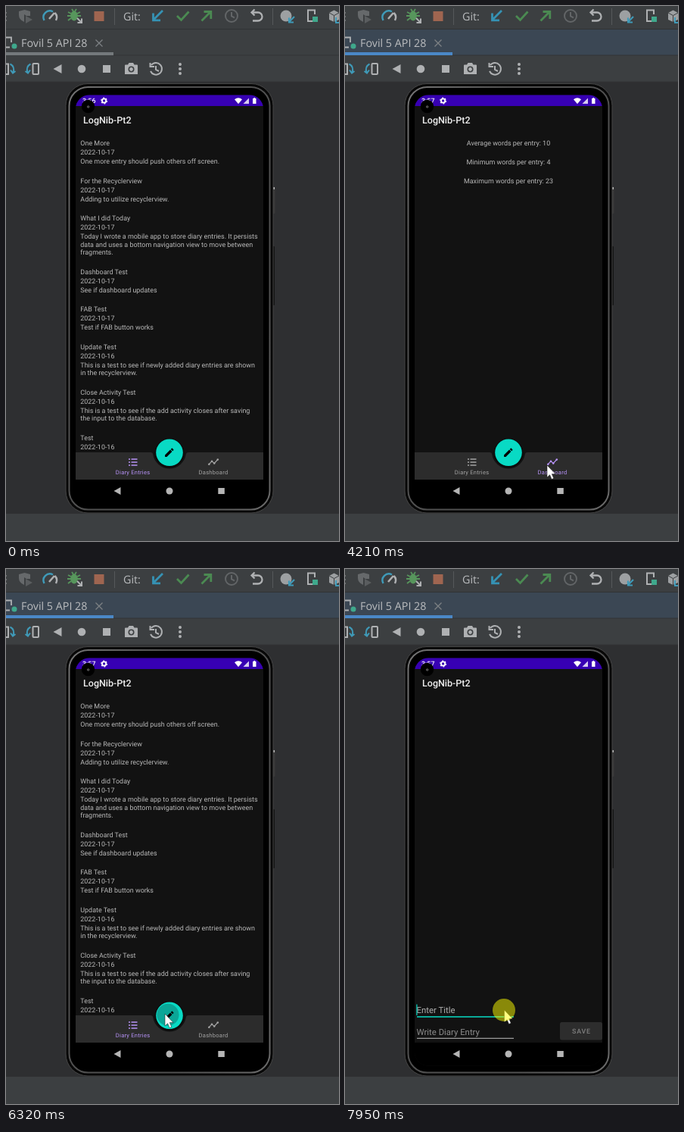
Recreate the animation shown at these times as an HTML page. Size 440 by 706 pixels, loop 8 s.

```html
<!DOCTYPE html>
<html lang="en">
<head>
<meta charset="utf-8">
<title>Diary app demo</title>
<style>
html, body { margin: 0; width: 100%; height: 100%; overflow: hidden; background: #2e2f31; }
svg { display: block; width: 440px; height: 706px; text-rendering: geometricPrecision; font-family: Roboto, sans-serif; }
.ide { font: 14.3px "Open Sans", sans-serif; fill: #bbbdbf; }
.body { font-size: 8.95px; fill: #b9b9b9; }
.tab { font-size: 7.57px; letter-spacing: .25px; text-anchor: middle; }
.hint { font-size: 11.36px; }
.mid { text-anchor: middle; }
.line { fill: none; stroke: currentColor; }
</style>
</head>
<body>
<svg viewBox="0 0 440 706" xmlns="http://www.w3.org/2000/svg">
<defs>
  <clipPath id="screenClip"><rect x="92" y="117.5" width="248" height="538" rx="18"/></clipPath>
  <clipPath id="listClip"><rect x="92" y="165" width="248" height="424"/></clipPath>
  <clipPath id="barClip"><path d="M92 589H191Q194 589 194.3 592A22 22 0 0 0 237.7 592Q238 589 241 589H340V625H92Z"/></clipPath>
  <clipPath id="fabClip"><circle cx="216" cy="589.3" r="17.8"/></clipPath>
  <linearGradient id="edge" x1="0" x2="1" y1="0" y2="1">
    <stop offset="0" stop-color="#757575"/><stop offset=".25" stop-color="#505050"/>
    <stop offset=".75" stop-color="#505050"/><stop offset="1" stop-color="#6a6a6a"/>
  </linearGradient>
</defs>

<!-- IDE chrome -->
<rect width="440" height="706" fill="#2e2f31"/>
<rect width="440" height="30" fill="#3c3f41"/>
<rect y="30" width="440" height="1" fill="#303234"/>
<rect id="strip" y="31" width="440" height="34" fill="#3c3f41"/>
<rect id="tabLine" y="61" width="142" height="4" fill="#74797c"/>
<rect y="65" width="440" height="35" fill="#3c3f41"/>
<rect y="64.5" x="142" width="298" height="1" fill="#323436"/>
<rect y="99.5" width="440" height="1" fill="#323436"/>
<rect y="670" width="440" height="36" fill="#3c3f41"/>

<g id="topIcons">
  <path d="M0 9H1M0 14H1M0 19H1" stroke="#6e7173" stroke-width="2"/>
  <path d="M17 7L24.500 5 32 7V13H27L24 11V21Q17 18 17 12Z" fill="#66696b"/>
  <path d="M26 13L35 18 26 23Z" fill="#5a5d5f"/>
  <g class="line" stroke-width="2.500"><path d="M50.500 19A8.500 8.500 0 0 1 62 7.500" color="#3f9ab8"/><path d="M64.500 9A8.500 8.500 0 0 1 66 19" color="#afb1b3"/><path d="M57 17L64 9" color="#afb1b3"/></g>
  <g color="#57965c"><ellipse cx="90" cy="13" rx="4.800" ry="6.500" fill="currentColor"/><path class="line" stroke-width="1.800" d="M82 8L86 10M98 8L94 10M81 13H99M82 19L86 16M87 4L89 7M93 4L91 7"/></g>
  <path d="M94 16L100 22M100 16.500V22H94.500" class="line" stroke-width="2" color="#afb1b3"/>
  <rect x="116.500" y="7" width="13" height="13" fill="#9f6550"/>
  <path d="M143.500 3V25M352.500 3V25" stroke="#56595b"/>
  <text class="ide" x="155" y="18.500">Git:</text>
  <g class="line" stroke-width="2.800">
    <path d="M207 6L195 18M194.500 9.500V18.800H204" color="#3592b4"/>
    <path d="M226 13L231.500 18.500 241.500 7.500" color="#4b8a52"/>
    <path d="M258.500 19.500L270 8M261.500 7.500H270.800V17" color="#4b8a52"/>
  </g>
  <g class="line" stroke-width="2" color="#626567"><circle cx="298" cy="13" r="8"/><path d="M298 8V13.500L302 15.500"/></g>
  <path class="line" stroke-width="2.300" color="#afb1b3" d="M328.500 4.500L324.500 8.500 328.500 12.500M325 8.500H333A5.500 5.500 0 0 1 333 19.500H326"/>
  <circle cx="370" cy="13" r="7.500" fill="#9da0a2"/>
  <path class="line" stroke-width="2.200" color="#3f9ab8" d="M381 14L374 21M374 15.500V21.500H380"/>
  <path class="line" stroke-width="2" color="#afb1b3" d="M406 20H399V5.500H408V11"/>
  <rect x="405" y="14" width="7" height="7" fill="#3fa88c"/>
  <path d="M427 9L433.500 5.500 440 9V18L433.500 21 427 18Z" fill="#9da0a2"/>
  <path class="line" d="M427 9L433.500 12.500 440 9M433.500 12.500V21" color="#3c3f41"/>
  <path class="line" stroke-width="2" color="#3f9ab8" d="M436 15V22H440"/>
</g>

<path class="line" stroke-width="1.800" color="#afb1b3" d="M0 41.500H7V48M0 54.500H5"/>
<circle cx="11" cy="53" r="3.500" fill="#3fa88c"/>
<text class="ide" x="20" y="54">Fovil 5 API 28</text>
<path d="M118.500 44.500L127.500 53.500M127.500 44.500L118.500 53.500" stroke="#7d8184" stroke-width="1.300"/>

<g id="deviceIcons" fill="#afb1b3" color="#afb1b3">
  <path class="line" stroke-width="2" d="M0 76.500H3V90H0"/>
  <rect class="line" stroke-width="2" x="35.500" y="76" width="7.500" height="14" rx="1"/>
  <path class="line" stroke-width="2" color="#3f9ab8" d="M5.500 76.500Q12 80 9.500 87.500M6 84.500L9 88.500 12.500 86M32.500 76.500Q26 80 28.500 87.500M32 84.500L29 88.500 25.500 86"/>
  <path d="M62.500 83L73.500 77V89Z"/>
  <circle cx="100" cy="83" r="5.300"/>
  <rect x="128" y="78" width="10" height="10"/>
  <path d="M157 78.500Q157 77.500 158 77.500H161L162.500 75H168L169.500 77.500H173Q174 77.500 174 78.500V90H157Z"/>
  <circle cx="165.500" cy="83.500" r="4" fill="#3c3f41"/><circle cx="165.500" cy="83.500" r="2.400"/>
  <path class="line" stroke-width="2" d="M192 78A7.800 7.800 0 1 1 191 86M190.500 75V80H196M198 79V84L202 86"/>
  <circle cx="230" cy="77" r="2"/><circle cx="230" cy="83" r="2"/><circle cx="230" cy="89" r="2"/>
</g>

<!-- Phone body -->
<rect x="352" y="239" width="3.500" height="35" rx="1" fill="#3a3a3a"/>
<rect x="353" y="239" width="2" height="3" fill="#b5b5b5"/>
<rect x="352" y="317" width="3" height="78" rx="1" fill="#141414"/>
<rect x="79" y="102.500" width="274" height="566.500" rx="29" fill="#080808" stroke="#454545"/>
<rect x="83.500" y="107" width="265" height="557.500" rx="25" fill="#000" stroke="url(#edge)" stroke-width="2"/>

<!-- Phone screen -->
<g clip-path="url(#screenClip)">
  <rect x="92" y="117" width="248" height="508" fill="#121212"/>
  <g id="home">
    <g id="list" clip-path="url(#listClip)" class="body"></g>
    <g id="stats" class="body mid"></g>
    <g clip-path="url(#barClip)">
      <rect x="92" y="589" width="248" height="36" fill="#2c2c2c"/>
      <circle id="ripple" cy="607" fill="#bb86fc"/>
    </g>
    <g id="diaryTab">
      <path d="M162 598H164M162 602H164M162 606H164M165.500 598H173.500M165.500 602H173.500M165.500 606H173.500" class="line" stroke-width="1.400"/>
      <text class="tab" x="167.600" y="618.200" fill="currentColor">Diary Entries</text>
    </g>
    <g id="dashTab">
      <path d="M268.300 604.700L272 600.800 275.200 603.500 279.800 598.500" class="line" stroke-width="1.200"/>
      <g fill="currentColor"><circle cx="268.300" cy="604.700" r="1.300"/><circle cx="272" cy="600.800" r="1.300"/><circle cx="275.200" cy="603.500" r="1.300"/><circle cx="279.800" cy="598.500" r="1.300"/></g>
      <text class="tab" x="274" y="618.200" fill="currentColor">Dashboard</text>
    </g>
    <circle cx="216" cy="590" r="19.500" fill="#000" opacity=".35"/>
    <circle cx="216" cy="589.300" r="17.800" fill="#08dac4"/>
    <circle id="fabRipple" clip-path="url(#fabClip)" fill="#0c9488"/>
    <path transform="translate(208.200 581.700) scale(.631)" d="M3 17.250V21h3.750L17.810 9.940l-3.750-3.750zM20.710 7.040c.39-.39.39-1.020 0-1.410l-2.340-2.340c-.39-.39-1.020-.39-1.410 0l-1.830 1.830 3.750 3.750z"/>
  </g>
  <g id="form">
    <rect x="92" y="132" width="248" height="540" fill="#121212"/>
    <text id="titleHint" class="hint" x="94.500" y="586">Enter Title</text>
    <rect id="titleLine" x="95" width="128"/>
    <rect id="caret" x="94.300" y="574.500" width="1.200" height="14.500" fill="#08dac4"/>
    <text class="hint" x="94.500" y="614.800" fill="#8c8c8c">Write Diary Entry</text>
    <rect x="95" y="618.800" width="128" height="1" fill="#bdbdbd"/>
    <rect x="284" y="598" width="56" height="23.500" rx="2.500" fill="#2d2d2d"/>
    <text class="mid" x="312.400" y="613" font-size="8.830" font-weight="500" letter-spacing=".79" fill="#808080">SAVE</text>
  </g>
  <rect x="92" y="117" width="248" height="15" fill="#3700b3"/>
  <text x="102" y="154.800" font-size="12.500" font-weight="500" fill="#f0f0f0">LogNib-Pt2</text>
  <text id="clock" x="101" y="128.200" font-size="8.830" font-weight="500" fill="#fff"></text>
  <circle cx="129.600" cy="125" r="2.600" fill="none" stroke="#fff" stroke-width="1.900"/>
  <circle cx="129.600" cy="125" r="3.900" fill="none" stroke="#fff" stroke-width="1.100" stroke-dasharray="2.040"/>
  <g fill="#fff">
    <path d="M307 129.200L302 123.200Q307 119.200 312 123.200Z"/>
    <path d="M313.500 129L321 121.500V129Z" opacity=".8"/>
    <path d="M326 122H327.300V121H329.200V122H330.500V129H326Z"/>
  </g>
  <rect x="92" y="625" width="248" height="31" fill="#000"/>
  <g fill="#b5b5b5"><path d="M142.500 640L151.500 635V645Z"/><circle cx="216" cy="640" r="4.500"/><rect x="280.300" y="636" width="8.500" height="8"/></g>
</g>
<circle cx="108.500" cy="132.500" r="8.700" fill="#000"/>
<circle cx="108.700" cy="133" r="1.300" fill="#333" stroke="#777" stroke-width=".7"/>

<path id="pointer" d="M0 0V16L3.600 12.700 6.100 18.500 8.800 17.300 6.300 11.600H11Z" fill="#fff" stroke="#111" stroke-width=".5"/>
<circle id="press" r="15" fill="#ff0" opacity=".5"/>
</svg>

<script>
const LOOP = 8000, STEP = 66.7;
const $ = id => document.getElementById(id);
const clamp = v => Math.max(0, Math.min(1, v));
const easeOut = v => 1 - (1 - clamp(v)) ** 3;
const set = (id, attrs) => { for (const k in attrs) $(id).setAttribute(k, attrs[k]); };
const show = (id, on) => set(id, { visibility: on ? 'visible' : 'hidden' });
const text = (x, y, s) => `<text x="${x}" y="${y}">${s}</text>`;

const entries = [
  ['One More', 17, 'One more entry should push others off screen.'],
  ['For the Recyclerview', 17, 'Adding to utilize recyclerview.'],
  ['What I did Today', 17, 'Today I wrote a mobile app to store diary entries. It persists',
    'data and uses a bottom navigation view to move between', 'fragments.'],
  ['Dashboard Test', 17, 'See if dashboard updates'],
  ['FAB Test', 17, 'Test if FAB button works'],
  ['Update Test', 16, 'This is a test to see if newly added diary entries are shown', 'in the recyclerview.'],
  ['Close Activity Test', 16, 'This is a test to see if the add activity closes after saving', 'the input to the database.'],
  ['Test', 16]
];
let rowY = 184;
$('list').innerHTML = entries.map(([title, day, ...lines]) => {
  const y = rowY;
  rowY += 49.5 + 10.5 * (lines.length - 1);
  return text(98.3, y, title) + text(98.3, y + 12.1, '2022-10-' + day) +
    lines.map((s, i) => text(98.3, y + 24 + i * 10.5, s)).join('');
}).join('');
$('stats').innerHTML = ['Average words per entry: 10', 'Minimum words per entry: 4', 'Maximum words per entry: 23']
  .map((s, i) => text(216, 184 + i * 25, s)).join('');

// Pointer moves: start time, then one stop per step.
const moves = [
  [520, [430, 503], [408, 521], [394, 548], [406, 568]],
  [1850, [388, 571], [344, 584], [305, 597], [286, 603]],
  [4210, [267, 606], [248, 616], [228, 623], [208, 622], [190, 615], [177, 608], [172, 605]],
  [4800, [157, 603], [168, 599.5]],
  [5930, [172, 608], [184, 623], [198, 627], [207, 612], [210, 587]],
  [6740, [210, 585], [210, 572], [210, 555], [210, 546]],
  [7620, [210, 551], [211, 564], [210, 577], [210.5, 582]]
];
const presses = [[2850, 2985], [5010, 5210], [6200, 6300], [7880, LOOP]];

function pointerAt(t) {
  const move = moves.filter(m => t >= m[0]).pop();
  if (!move) return null;
  return move[Math.min(move.length - 1, 1 + Math.floor((t - move[0]) / STEP + .02))];
}

function navRipple(t) {
  const [start, end, cx] = t < 4500 ? [2850, 3400, 274] : [5010, 5730, 167.6];
  const fade = 1 - clamp((t - start - 200) / (end - start - 200));
  set('ripple', { cx, r: 6 + 46 * easeOut((t - start) / 260), opacity: t < start ? 0 : .16 * fade });
}

function draw(t) {
  const focused = t >= 2850, dash = t >= 2985 && t < 5210, editing = t >= 7945;
  set('strip', { fill: focused ? '#3b4754' : '#3c3f41' });
  set('tabLine', { fill: focused ? '#4a88c7' : '#74797c' });
  $('clock').textContent = t < 990 ? '3:56' : '3:57';

  show('list', !dash);
  show('stats', dash);
  set('diaryTab', { color: dash ? '#a3a3a3' : '#b692f6' });
  set('dashTab', { color: dash ? '#b692f6' : '#a3a3a3' });
  navRipple(t);

  const grow = easeOut((t - 6200) / 400);
  set('fabRipple', {
    cx: 210 + 6 * grow, cy: 587 + 2 * grow, r: 4 + 16 * grow,
    opacity: t < 6200 ? 0 : .75 * (1 - clamp((t - 6340) / 250))
  });

  const open = easeOut((t - 6440) / 300);
  show('form', t >= 6440);
  set('form', { opacity: open, transform: `translate(0 ${(1 - open) * 36})` });
  set('titleHint', { fill: editing ? '#b0b0b0' : '#8c8c8c' });
  set('titleLine', editing ? { y: 590.2, height: 1.5, fill: '#08dac4' } : { y: 590.7, height: .8, fill: '#303030' });
  set('caret', { opacity: editing ? 1 : 0 });

  const p = pointerAt(t);
  show('pointer', p);
  show('press', presses.some(([a, b]) => t >= a && t < b));
  if (p) {
    set('pointer', { transform: `translate(${p})` });
    set('press', { cx: p[0] - .5, cy: p[1] });
  }
}

const begin = performance.now();
function tick() {
  draw((performance.now() - begin) % LOOP);
  requestAnimationFrame(tick);
}
tick();
</script>
</body>
</html>
```
